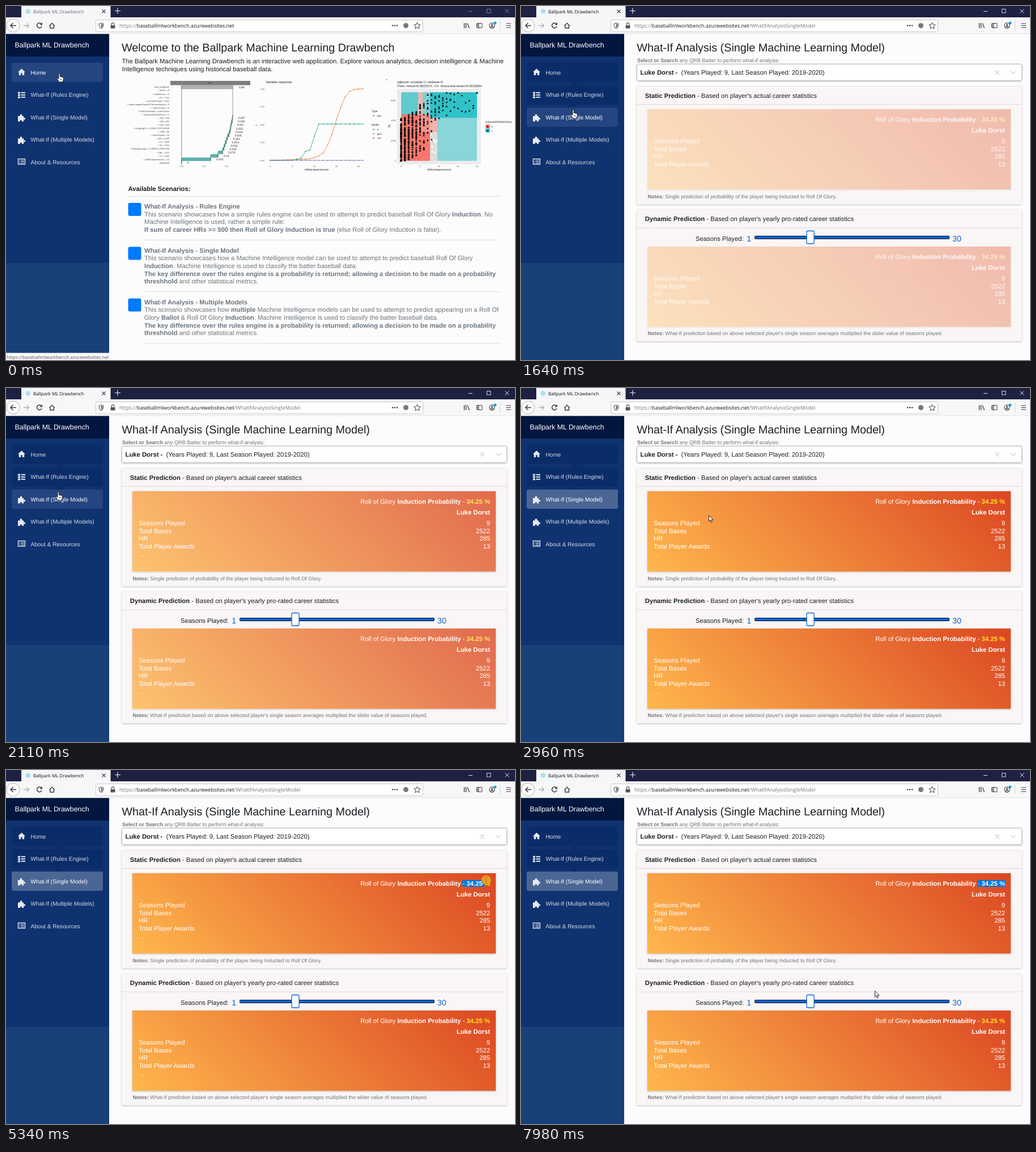
Animation, 898 px wide and 624 px high, one loop 8 s. Source, as an HTML page:

```html
<!DOCTYPE html>
<html lang="en">
<head>
<meta charset="utf-8">
<title>Ballpark ML Drawbench</title>
<style>
html, body { margin: 0; width: 100%; height: 100%; overflow: hidden; background: #fcfcfc; }
svg { display: block; width: 898px; height: 624px; }
text { font-family: "Liberation Sans", Arial, sans-serif; white-space: pre; text-rendering: geometricPrecision; }
.ui text { font-family: "Open Sans", "Noto Sans", sans-serif; }
</style>
</head>
<body>
<svg id="stage" viewBox="0 0 898 624" xmlns="http://www.w3.org/2000/svg"></svg>
<script>
const LOOP = 8000, BODY = 11.29;
const APP = 'Ballpark ML Drawbench', PLAYER = 'Luke Dorst';
const HOST = 'baseballmlworkbench.azurewebsites.net';
const GREEN = '#1b9e77', ORANGE = '#e6772e', PURPLE = '#7570b3', TEAL = '#5ab4ac';

// Drawing helpers; *words* in a text become bold.
const text = (x, y, size, str, attrs = '') =>
  `<text x="${x}" y="${y}" font-size="${size}" ${attrs}>${str.replace(/\*(.+?)\*/g, '<tspan font-weight="700">$1</tspan>')}</text>`;
const rect = (x, y, w, h, fill, attrs = '') =>
  `<rect x="${x}" y="${y}" width="${w}" height="${h}" fill="${fill}" ${attrs}/>`;
const path = (d, stroke, width = 1, attrs = '') =>
  `<path d="${d}" fill="none" stroke="${stroke}" stroke-width="${width}" ${attrs}/>`;
const shape = (d, fill, attrs = '') => `<path d="${d}" fill="${fill}" ${attrs}/>`;
const dot = (x, y, r, fill, attrs = '') => `<circle cx="${x}" cy="${y}" r="${r}" fill="${fill}" ${attrs}/>`;
const group = (id, body, attrs = '') => `<g id="${id}" ${attrs}>${body}</g>`;
const range = n => [...Array(n).keys()];
const END = 'text-anchor="end"', MID = 'text-anchor="middle"';

function random(seed) {
  return () => (seed = (seed * 16807) % 2147483647) / 2147483647;
}

function browser() {
  const ink = '#3a3a40';
  return rect(0, 0, 898, 20, '#1f2142') + rect(27, 0, 157.5, 20, '#f5f6f7') +
    rect(0, 20, 898, 29, '#f7f7f8') + path('M0 49H898', '#d6d6da', .7) +
    dot(39, 9.5, 4.3, '#a9e0f2') +
    text(48, 12.8, 8.1, APP, 'id="tab"') +
    path('M169.500 6.500l6 6m0-6l-6 6', '#3a3a40', 1.1) +
    path('M192 8.500h10M197 3.500v10', '#e8e8f0', 1.2) +
    group('winbtn', path('M816 9.500h7M848.500 5.500h6.500v6.500h-6.500zM880.500 5.500l7 7m0-7l-7 7', 'currentColor', .9)) +
    dot(12.5, 34.5, 11.5, '#fdfdfd', 'stroke="#b4b4b8"') +
    path('M18 34.500H8m4.500-4.500L8 34.500l4.500 4.500', ink, 1.5) +
    path('M31 34.500h9.500m-4-4l4 4-4 4', '#b0b0b4', 1.3) +
    path('M62.800 32a4.400 4.400 0 1 0 .300 4', ink, 1.5) + shape('M64 29v4.500h-4.500z', ink) +
    path('M76.500 35l4.700-4.800 4.700 4.800M78 34v5h6.500v-5', ink, 1.4) +
    rect(158.5, 24.5, 577, 21, '#fff', 'rx="2" stroke="#c9c9ce"') +
    path('M168 30l4 1.500c0 4-1 6.500-4 8-3-1.500-4-4-4-8z', '#55555b', 1.1) + shape('M168 31.500l2.500 1q0 4-2.500 5.500z', '#55555b') +
    rect(184.5, 34, 8, 5.500, '#55555b', 'rx="1"') + path('M186.200 34v-2a2.300 2.300 0 0 1 4.600 0v2', '#55555b', 1.2) +
    text(200, 38.2, 9.05, `<tspan fill="#77777c">https://</tspan>${HOST}<tspan id="route" fill="#77777c"></tspan>`, 'fill="#17171a"') +
    [682, 686, 690].map(x => dot(x, 34.5, 1.3, ink)).join('') +
    dot(705.5, 34.5, 4.5, '#77777d') +
    path('M725.500 29l1.700 3.700 4 .400-3 2.700.900 4-3.600-2.100-3.600 2.100.900-4-3-2.700 4-.400z', ink, 1) +
    path('M808.500 30v9M811.500 30v9M814 30.500l3.500 8.500', ink, 1.3) +
    rect(830.5, 30.5, 9.5, 8, 'none', `rx="1" stroke="${ink}"`) + rect(831, 31, 4, 7, '#9a9aa0') +
    dot(857.5, 34.5, 4.6, 'none', `stroke="${ink}" stroke-width="1.100"`) + dot(857.5, 33.2, 1.5, ink) +
    path('M854.800 37.200q2.700-2.400 5.400 0', ink, 1.3) + dot(863, 30, 2.4, '#0a9be8') +
    path('M871.500 26v18', '#d6d6da') + path('M882.500 31h8.500m-8.500 3.500h8.500m-8.500 3.500h8.500', ink, 1.2);
}

function sidebar() {
  const white = '#e6eaf2';
  const rich = y => [-4.5, -.5, 3.5].map(d => rect(21, y + d, 4, 3, white) + rect(26.5, y + d + .3, 7.500, 2, white)).join('');
  const puzzle = y => shape(`M21 ${y - 2.5}h4c-2-4.500 5-4.500 3.200 0h3v3.300c4-1.800 4 4.500 0 2.700v3.500h-3.300c1.300-3.500-4.200-3.500-2.900 0h-4z`, white);
  const icons = [
    shape('M27.500 110.500l6.500 6h-1.800v5.500h-3.400v-3.800h-2.600v3.800h-3.400v-5.500H21z', white),
    rich(156), puzzle(196.5), puzzle(236),
    rect(21.5, 269.5, 12, 9.500, 'none', `stroke="${white}" stroke-width="1.300"`) +
      path('M23.500 272h1.500m1 0h6m-8.500 2.500h1.500m1 0h6m-8.500 2.500h1.500m1 0h6', white, 1)
  ];
  const names = ['Home', 'What-If (Rules Engine)', 'What-If (Single Model)', 'What-If (Multiple Models)', 'About &amp; Resources'];
  return rect(0, 49, 182, 405, '#0f3370') + rect(0, 453, 182, 171, '#194179') + rect(0, 49, 182, 40, '#03163f') +
    text(15.5, 73.4, 12.4, APP, 'fill="#fff"') +
    group('trail', shape('M88 139l4-5h6l4 5z', '#0a2d69') + shape('M86 179l4-5h6l4 5z', '#0a2d69')) +
    names.map((name, i) => rect(10, 100 + 39.5 * i, 161, 34, 'none', `rx="3" id="nav${i}"`) + icons[i] +
      text(43.5, 120.6 + 39.5 * i, 10.1, name, `id="label${i}"`)).join('');
}

function waterfall() {
  const labels = ['final_prognosis', 'MVPs = 0', 'GoldGloves = 0', 'ID = 7701', 'LastYearPlayed = 2014',
    'MajorLeaguePlayerOfTheYearAwards = 0', 'TripleCrowns = 0', 'FullPlayerName = Colin Marsh', 'InductedToRollOfGlory = 1',
    'SB = 358', 'HR = 260', 'X2B = 544', 'SluggingPct = 0.439571237153445', 'X3B = 66', 'YearsPlayed = 20', 'AB = 11195',
    'H = 3465', 'TB = 5791', 'BattingAverage = 0.309513175524768', 'RBI = 1311', 'R = 1923', 'AllStarAppearances = 14', '(intercept)'];
  const gains = [.007, .016, .011, .011, .018, .026, .021, .023, .018, .025, .079, .13, .504, 0];
  const rowY = i => 143 + 6.06 * i, px = v => 310 + 101 * v;
  let out = rect(290, 132, 141, 7.500, '#7d7d7d') + rect(357, 135, 5, 1.500, '#444'), sum = 0;
  labels.forEach((s, i) => out += text(288, rowY(i) + 1.4, 3.85, (i && i < 22 ? '+ ' : '') + s, `${END} fill="#444"`));
  gains.map((v, i) => [v, i + 9]).reverse().forEach(([v, i]) => {
    out += rect(px(sum), rowY(i) - 2.8, 101 * v, 5.500, TEAL, 'stroke="#3c8f88" stroke-width=".4"');
    sum += v;
    out += path(`M${px(sum)} ${rowY(i) + 2.8}v-8.500`, '#333', .7) + text(px(sum) + 10, rowY(i) + 1.8, 4.9, String(v), 'fill="#222"');
  });
  out += rect(310, 140, 90.3, 6, '#b4b1ae', 'stroke="#777" stroke-width=".5"') + text(411, 144.8, 4.9, '0.89', 'fill="#222"');
  out += path('M400 146V195', '#333', .8, 'stroke-dasharray="1.500 1"') + path('M309.700 140V279', '#555', .7);
  return out + [0, .4, .8].map(v => text(310 + 99 * v, 284, 4, v.toFixed(1), `${MID} fill="#555"`)).join('') +
    text(440, 212, 5, '&lt;-', 'fill="#222"');
}

function response() {
  const x = k => 466 + 7.8 * k, y = v => 272.5 - 126.5 * v;
  const curve = (f, color) => {
    const pts = range(22).map(k => [x(k), y(f(k))]);
    return path('M' + pts.map(p => p.join(' ')).join('L'), color, .8) + pts.map(p => dot(p[0], p[1], .9, color)).join('');
  };
  const rise = [.016, .02, .025, .04, .065, .107, .215, .37, .57, .745, .89, .965, .99, .998, 1];
  const boost = k => k < 7 ? .003 + .002 * k : rise[k - 7];
  const tree = k => k < 5 ? .003 : k < 11 ? [.005, .02, .035, .13, .145, .34][k - 5] : .51;
  const key = (yy, name, color) => path(`M646 ${yy}h5`, color, .7) + dot(648.5, yy, 1, color) + text(655, yy + 1.4, 4, name);
  return text(458, 136.2, 5.8, 'Variable response') +
    curve(boost, ORANGE) + curve(tree, GREEN) + curve(() => .003, PURPLE) +
    range(5).map(i => text(456, y(i / 4) + 1.5, 4, (i / 4).toFixed(2), `${END} fill="#555"`) +
      text(x(i * 5), 284, 4, String(i * 5), `${MID} fill="#555"`)).join('') +
    text(548, 290, 4.8, 'AllStarAppearances', MID) +
    text(645, 187, 4.8, 'Type') + dot(648.5, 193.3, 1, '#222') + text(655, 195, 4, 'pdp') +
    text(645, 211.3, 4.8, 'Model') + key(217.5, 'd', GREEN) + key(225.3, 'gbm', ORANGE) + key(233, 'svm', PURPLE);
}

function boundary() {
  const rnd = random(77), x = k => 697 + 6.7 * k, y = tb => 273 - .0178 * tb;
  let out = dot(671.5, 130, .8, '#111') + text(690, 136.2, 5.75, 'xgboost: nrounds=1; verbose=0') +
    text(690, 142.5, 5.75, 'Train: mmce=0.0022371; CV: mmce.test.mean=0.0033554') +
    rect(690, 146, 148, 133, '#ebebeb');
  range(5).forEach(i => out += path(`M${x(i * 5)} 146V279`, '#fff', .7) + text(x(i * 5), 284, 4, String(i * 5), `${MID} fill="#555"`));
  range(4).forEach(i => out += path(`M690 ${y(i * 2000)}H838`, '#fff', .7) + text(688, y(i * 2000) + 1.5, 4, String(i * 2000), `${END} fill="#555"`));
  out += rect(697, 152, 30.5, 39, '#62cacd') + rect(727.500, 152, 7.500, 39, '#f4b5b0') +
    rect(735, 152, 13, 39, '#7fd1d3') + rect(748, 152, 83, 45, '#2fc2c8') + rect(697, 191, 51, 82, '#f8766d') +
    rect(727.500, 191, 20.500, 31, '#f4928b') + rect(748, 197, 13, 76, '#dcdcdc') + rect(748, 197, 13, 25, '#f0b3ae') + rect(761, 197, 70, 76, '#8ad5d8');
  const tri = (px, py, fill) => shape(`M${px} ${py - 1.8}l1.900 3.300h-3.800z`, fill);
  range(21).forEach(k => range(Math.round(Math.max(2, 110 * Math.exp(-k / 3.8)))).forEach(() => {
    const low = k < 9 ? 30 * k * k : Math.min(4600, 2200 + 190 * k), span = k < 9 ? 4200 + 130 * k : 2500;
    out += tri(x(k), y(Math.min(6750, low + span * rnd())), '#0c0c0c');
  }));
  range(20).forEach(() => out += tri(749 + 11 * rnd(), 224 + 47 * rnd(), '#f6f6f6'));
  return out + text(0, 0, 4.8, 'TB', `${MID} transform="translate(677.500 212) rotate(-90)"`) +
    text(764, 290, 4.8, 'AllStarAppearances', MID) + text(846, 206, 4.7, 'InductedToRollOfGlory') +
    ['#f8766d', '#1fbfc4'].map((c, i) => rect(846, 209 + 7.2 * i, 7.500, 6.600, c) + tri(849.7, 212.4 + 7.2 * i, '#111') +
      text(856, 214 + 7.2 * i, 4, String(i))).join('');
}

function homePage() {
  const rule = (x, y) => path(`M${x} ${y}H872`, '#dfe1e3');
  const key = ['*The key difference over the rules engine is a probability is returned; allowing a decision to be made on a probability*',
    '*threshhold* and other statistical metrics.'];
  const items = [
    [357.2, ['*What-If Analysis - Rules Engine*',
      'This scenario showcases how a simple rules engine can be used to attempt to predict baseball Roll Of Glory *Induction*. No',
      'Machine Intelligence is used, rather a simple rule:',
      '*If sum of career HRs &gt;= 500 then Roll of Glory Induction is true* (else Roll of Glory Induction is false).']],
    [434.8, ['*What-If Analysis - Single Model*',
      'This scenario showcases how a Machine Intelligence model can be used to attempt to predict baseball Roll Of Glory',
      '*Induction*. Machine Intelligence is used to classify the batter baseball data.', ...key]],
    [525.8, ['*What-If Analysis - Multiple Models*',
      'This scenario showcases how *multiple* Machine Intelligence models can be used to attempt to predict appearing on a Roll Of',
      'Glory *Ballot* &amp; Roll Of Glory *Induction*. Machine Intelligence is used to classify the batter baseball data.', ...key]]
  ];
  return text(204, 80.2, 19.75, 'Welcome to the Ballpark Machine Learning Drawbench') +
    text(204.5, 101.4, BODY, 'The Ballpark Machine Learning Drawbench is an interactive web application. Explore various analytics, decision intelligence &amp; Machine') +
    text(204.5, 115, BODY, 'Intelligence techniques using historical baseball data.') +
    waterfall() + response() + boundary() +
    text(215.5, 326.4, BODY, '*Available Scenarios:*') + rule(215.5, 335.5) +
    items.map(([y, lines]) => rect(215.5, y - 10.2, 23, 23, '#007bff', 'rx="3"') +
      lines.map((s, i) => text(244, y + 13.6 * i, BODY, s, 'fill="#6c757d"')).join('') +
      rule(244, Math.round(y + 13.6 * lines.length) + .5)).join('');
}

function panel(dy) {
  const rows = [['Seasons Played', 9], ['Total Bases', 2522], ['HR', 285], ['Total Player Awards', 13]];
  return `<g transform="translate(0 ${dy})" fill="#fff">` + rect(223, 182, 641, 141.500, 'url(#heat)', 'filter="url(#soft)"') +
    text(854, 203.9, BODY, 'Roll of Glory *Induction Probability* - <tspan class="pct" font-weight="700">34.25 %</tspan>', END) +
    text(854, 222.8, BODY, `*${PLAYER}*`, END) +
    rows.map(([name, v], i) => text(234, 241.9 + 13.65 * i, BODY, name) + text(854, 241.9 + 13.65 * i, BODY, String(v), END)).join('') +
    text(234, 296.5, BODY, '...', 'opacity=".85"') + '</g>';
}

function modelPage() {
  const card = (y, h, title, rest, note) => rect(204.5, y, 679, h, '#faf6f6', 'filter="url(#soft)" rx="1"') +
    path(`M204.500 ${y + 31.5}H883.500`, '#dedada') +
    text(218.8, y + 19.7, BODY, `*${title}* - Based on player's ${rest}`) +
    text(223.5, y + h - 10.6, 9.1, `*Notes:* ${note}`, 'fill="#6c757d"');
  const blue = '#0b63d6';
  return text(204.3, 80.2, 19.8, 'What-If Analysis (Single Machine Learning Model)') +
    text(205, 99.3, 9.2, '*Select or Search* any QRB Batter to perform what-if analysis:', 'fill="#6c757d"') +
    rect(204.5, 102.5, 679, 29, '#fff', 'rx="3" stroke="#bdbdbd" filter="url(#soft)"') +
    text(210.5, 120.8, BODY, `*${PLAYER} - * (Years Played: 9, Last Season Played: 2019-2020)`) +
    path('M836.500 113.500l7.500 7.500m0-7.500l-7.500 7.500M864 115l4.500 4 4.500-4', '#d0d0d0', 1.1) +
    card(142, 207.5, 'Static Prediction', 'actual career statistics',
      'Single prediction of probability of the player being Inducted to Roll Of Glory.') +
    card(359.5, 231.5, 'Dynamic Prediction', 'yearly pro-rated career statistics',
      "What-If prediction based on above selected player's single season averages multiplied the slider value of seasons played.") +
    text(308, 414.4, BODY, 'Seasons Played:') + text(398.2, 414.6, 14.2, '1', `fill="${blue}"`) + text(761, 414.6, 14.2, '30', `fill="${blue}"`) +
    rect(412.5, 405.5, 343, 5, blue, 'rx="1" stroke="#0a1020"') +
    rect(504, 396.5, 13, 22.500, '#fff', `rx="2" stroke="${blue}" stroke-width="1.300"`) +
    group('panels', panel(0) + panel(242)) +
    rect(805, 194, 0, 12, '#0078d7', 'id="sel"') +
    text(854, 203.9, BODY, ' - *34.25 %*', `${END} fill="#fff" clip-path="url(#selclip)"`);
}

const stage = document.getElementById('stage');
stage.innerHTML = `<defs>
  <linearGradient id="heat" gradientUnits="userSpaceOnUse" x1="348" y1="448" x2="739" y2="57">
    <stop stop-color="#ffb74d"/><stop offset="1" stop-color="#db4723"/></linearGradient>
  <filter id="soft" x="-5%" y="-10%" width="110%" height="120%"><feDropShadow dx="0" dy=".700" stdDeviation="1.500" flood-opacity=".3"/></filter>
  <clipPath id="selclip"><rect id="selbox" x="805" y="190" width="0" height="20"/></clipPath></defs>` +
  rect(0, 0, 898, 624, '#fcfcfc') +
  group('home', homePage(), 'fill="#1b1f23"') + group('model', modelPage(), 'fill="#1b1f23"') + sidebar() +
  group('chrome', browser(), 'class="ui"') +
  group('status', rect(0, 611.5, 182, 13, '#f9f9fa', 'id="bar"') + text(1.5, 621.6, 8.05, '', 'id="link" fill="#55555a"'), 'class="ui"') +
  dot(0, 0, 8.5, '#eda81f', 'id="press" opacity=".88"') +
  group('hand', shape('M3 1.200Q3 0 4.200 0T5.400 1.200V6l1.200-.600 1.200.800 1.300-.300 1 .900 1.200.300V11l-1.500 4H4L0 9.500q-.300-1.600 1.300-1.400L3 9.700z', '#fff', 'stroke="#111" stroke-width=".9"') +
    path('M6.200 9v3M8 9v3', '#111', .6), 'stroke-linejoin="round"') +
  group('arrow', shape('M.500.500V11l2.400-2.200L4.600 12.800l1.700-.700L4.600 8.200H8z', '#fff', 'stroke="#111" stroke-width=".9"')) +
  group('beam', path('M-2.500-6q2 0 2.500 1 .500-1 2.500-1M0-5V5M-2.500 6q2 0 2.500-1 .500 1 2.500 1', '#4a4030', .8), 'opacity=".5"');

const $ = id => document.getElementById(id);
const set = (id, key, value) => $(id).setAttribute(key, value);
const show = (id, on) => set(id, 'display', on ? 'inline' : 'none');

// Each move: first step, last step, step count, end point, easing power.
const MOVES = [
  [500, 890, 6, 91, 183, 1], [2900, 2960, 2, 331, 224, 1], [3170, 3330, 3, 567, 234, 1.5],
  [3580, 3740, 3, 784, 208, 1.5], [3900, 4490, 9, 805.5, 199.5, 1.5], [5060, 5590, 8, 850, 194, 4],
  [6760, 7240, 7, 807, 297, 1.3], [7460, 7610, 3, 677, 374, 1.3], [7830, 7980, 3, 624, 389, 1.5]
];
const FADES = [1370, 1430, 1490, 1640, 1740, 1800, 1960, 2110, 2330];
const STOPS = [805, 812.6, 818.9, 825.2, 828.3, 834.6, 840.9, 844, 854];

function pointer(t) {
  let x = 93, y = 119;
  for (const [from, to, n, ex, ey, pow] of MOVES) {
    if (t < from) break;
    const step = Math.min(n, Math.floor((t - from) / ((to - from) / (n - 1)) + 1e-6) + 1);
    const k = 1 - (1 - step / n) ** pow;
    x += (ex - x) * k;
    y += (ey - y) * k;
  }
  return [x, y];
}

function draw(t) {
  const [x, y] = pointer(t), onModel = t >= 1190, active = t >= 1110;
  show('home', !onModel);
  show('model', onModel);
  $('route').textContent = onModel ? '/WhatIfAnalysisSingleModel' : '';
  set('tab', 'fill', active ? '#101014' : '#6a6a72');
  set('winbtn', 'color', active ? '#f4f4f8' : '#8a8ca0');

  const hover = t >= 2900 ? -1 : y < 137 ? 0 : y < 176 ? 1 : 2;
  const current = hover < 0 ? 2 : hover;
  range(3).forEach(i => set('nav' + i, 'fill',
    i < current ? '#0a2d69' : i > current ? 'none' : hover < 0 ? '#4b6693' : '#24457f'));
  range(5).forEach(i => set('label' + i, 'fill', i === current ? '#fff' : '#d5dae4'));
  show('trail', current === 2);

  const route = ['', '/WhatIfAnalysisRules', '/WhatIfAnalysisSingleModel'][current];
  $('link').textContent = 'https://' + HOST + route;
  set('bar', 'width', [182, 262, 287][current]);
  set('status', 'opacity', t < 1270 ? 1 : t < 1370 ? .38 : 0);

  const fade = FADES.filter(s => s <= t).pop();
  set('panels', 'opacity', fade ? Math.min(1, (fade - 1290) / 1030) : 0);
  document.querySelectorAll('.pct').forEach(p => p.setAttribute('fill', t < 2650 ? '#ffe040' : '#ffe01f'));

  const near = STOPS.reduce((a, b) => Math.abs(b - x) < Math.abs(a - x) ? b : a);
  const sel = t < 5060 ? 0 : t < 5590 ? near - 805 : 49;
  set('sel', 'width', sel);
  set('selbox', 'width', sel);

  const kind = t < 2900 ? 'hand' : t >= 3900 && y < 209 ? 'beam' : 'arrow';
  ['hand', 'arrow', 'beam'].forEach(id => show(id, id === kind));
  set(kind, 'transform', `translate(${kind === 'hand' ? x - 3 : x} ${y})`);
  show('press', t >= 4810 && t < 5970);
  set('press', 'transform', `translate(${x} ${y})`);
}

const start = performance.now();
function tick(now) {
  draw(Math.max(0, now - start) % LOOP);
  requestAnimationFrame(tick);
}
draw(0);
requestAnimationFrame(tick);
</script>
</body>
</html>
```
